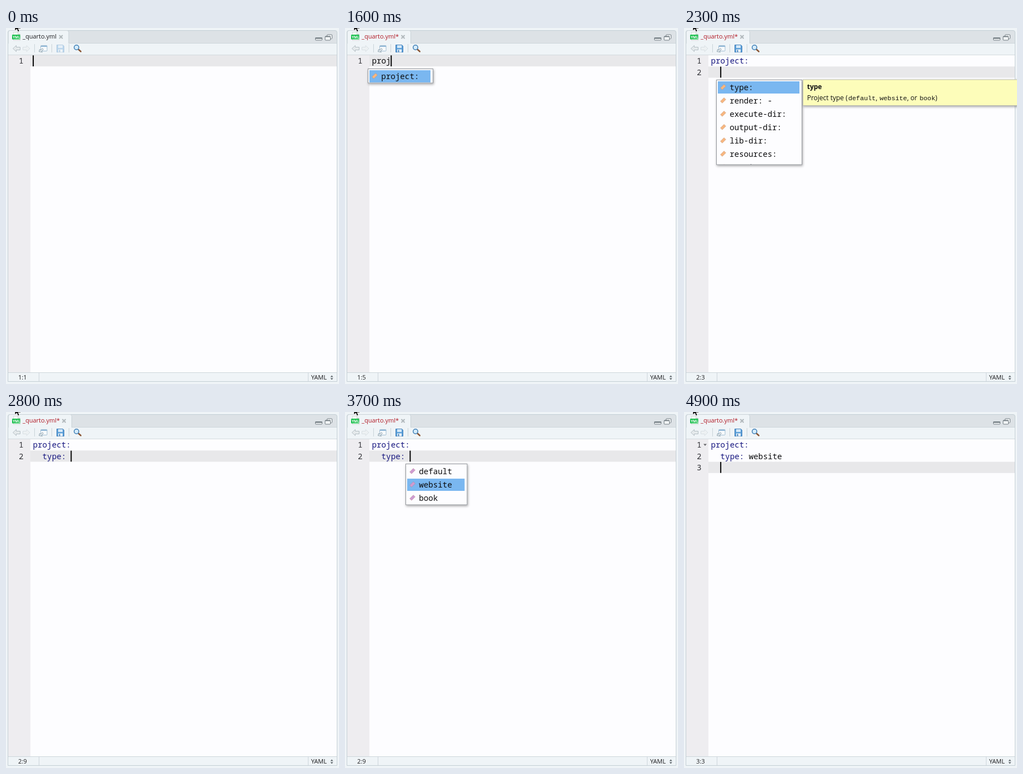
These frames come from a looping animation (600 by 641 pixels, 5000 ms). An HTML page:

```html
<!DOCTYPE html>
<html lang="en">
<head>
<meta charset="utf-8">
<title>Editor completion</title>
<style>
html, body { margin: 0; width: 100%; height: 100%; overflow: hidden; background: #eff4f7; }
svg { display: block; width: 600px; height: 641px; }
text { white-space: pre; font: 11px "Open Sans", "Noto Sans", sans-serif; fill: #1c1c1e; }
.code { font: 14.22px "Noto Sans Mono", "DejaVu Sans Mono", monospace; fill: #0b0b0d; }
.key { fill: #16167f; }
.num { fill: #333338; }
.tip { font-size: 12px; fill: #111; }
.mono { font: 11.75px "Liberation Mono", monospace; }
</style>
</head>
<body>
<svg viewBox="0 0 600 641" xmlns="http://www.w3.org/2000/svg">
  <defs>
    <filter id="shadow" x="-20%" y="-30%" width="140%" height="170%">
      <feDropShadow dx="1" dy="2" stdDeviation="2" flood-opacity=".35"/>
    </filter>
    <clipPath id="listClip"><rect x="59" y="94" width="153" height="151.5"/></clipPath>
  </defs>

  <!-- window -->
  <rect width="600" height="641" fill="#eff4f7"/>
  <path d="M3.5 636.5V8q0-3.5 3.5-3.5H593q3.5 0 3.5 3.5V636.5z" fill="#dde2e6" stroke="#c3ced4"/>
  <rect x="4" y="27" width="592" height="21" fill="#eff4f7"/>
  <path d="M113 27.5H596" stroke="#ced6db"/>
  <path id="tab" fill="#eff4f7" stroke="#c9d2d7"/>
  <rect x="4" y="48" width="592" height="573" fill="#fdfdff"/>
  <rect x="4" y="48" width="40" height="573" fill="#eeedf0"/>
  <path d="M4 48.5H596" stroke="#d3dade"/>
  <rect x="4" y="621" width="592" height="15" fill="#eff4f7"/>
  <path d="M4 620.5H596M59.5 621V636M544.5 621V636" stroke="#cdd6db"/>

  <!-- file icon -->
  <path d="M13.5 7.5H21.500L25.500 11.500V22.500H13.500z" fill="#fafcfb" stroke="#d3dbd8"/>
  <path d="M21.500 7.500V11.500H25.500" fill="none" stroke="#c3cfc8"/>
  <rect x="11" y="12" width="14.500" height="8.500" rx="1" fill="#18bf4c"/>
  <text x="12.200" y="18.600" style="font-size:6.200px;font-weight:700;fill:#fff">YML</text>

  <!-- toolbar -->
  <path id="back" d="M12.500 37L18.500 31.500V34.500H25.500V39.500H18.500V42.500z" fill="#e5eaec" stroke="#b5bfc5" stroke-linejoin="round"/>
  <path d="M43 37L37 31.500V34.500H30.500V39.500H37V42.500z" fill="#edf1f3" stroke="#d9e0e4" stroke-linejoin="round"/>
  <path d="M51.500 29V44M82.500 29V44M113.500 29V44" stroke="#c9d3d8"/>
  <rect x="62.500" y="31.500" width="11.500" height="10" rx="1" fill="#f7fafc" stroke="#a3bfd3"/>
  <path d="M63 33H74" stroke="#93b9d8" stroke-width="2"/>
  <path d="M59.500 42.500L60.500 38.500L62 40L65.500 36.500L67.500 38.500L64 42L65.500 43.500z" fill="#dfe7ec" stroke="#8195a3" stroke-width=".8"/>
  <g id="save">
    <path d="M91.500 30.500H102.500L104.500 32.500V43.500H91.500z" fill="#5c9fd8" stroke="#4381bb"/>
    <rect x="94" y="31" width="8" height="5" fill="#d4e8f8"/>
    <rect x="94" y="38.500" width="8" height="5" fill="#f4f8fb"/>
    <rect x="95.500" y="39.500" width="2" height="4" fill="#4381bb"/>
  </g>
  <path d="M130.500 38.500L134.700 42.300" stroke="#8a5534" stroke-width="2.600" stroke-linecap="round"/>
  <circle cx="127" cy="35" r="4.200" fill="#d6ecfb" stroke="#3f7fb6" stroke-width="1.500"/>

  <!-- window buttons -->
  <rect x="557.500" y="17.500" width="12" height="4.500" rx="1" fill="#f2f5f6" stroke="#737d83"/>
  <path d="M557 18.500H570" stroke="#737d83" stroke-width="2"/>
  <rect x="578.500" y="12" width="9" height="7.500" rx="1" fill="#f2f5f6" stroke="#737d83"/>
  <rect x="575" y="15" width="9.500" height="7" rx="1" fill="#f2f5f6" stroke="#737d83"/>
  <path d="M575 15.500H584.500" stroke="#737d83" stroke-width="1.600"/>

  <path d="M16 -11V5L19.500 1.800L21.600 6.800L24 5.800L22 1H27z" fill="#000" stroke="#fff" stroke-width=".8"/>

  <text id="title" x="30" y="19"></text>
  <path id="close" d="M-3 -3L3 3M3 -3L-3 3" stroke="#b0b7bb" stroke-width="2"/>
  <text id="pos" x="22" y="633"></text>
  <text x="549.800" y="633">YAML</text>
  <path d="M584.500 628.500L587 625.500L589.500 628.500zM584.500 630.500L587 633.500L589.500 630.500z" fill="#5b6368"/>
  <g id="view"></g>
</svg>
<script>
const LOOP = 5000, COL = 8.54, LEFT = 48.5, ROW = 20.3;
const $ = id => document.getElementById(id);

const fields = ["type:", "render: -", "execute-dir:", "output-dir:", "lib-dir:", "resources:", "preview:"];
const kinds = ["default", "website", "book"];
const start = { box: [41.5, 73.500, 117, 25.500], items: ["project:"], color: "#f7b780" };
const list = { box: [58.500, 93.500, 154, 152.500], items: fields, color: "#f7b780", clip: true };
const types = { box: [109.500, 93.500, 110.500, 73.500], items: kinds, color: "#cf9bd2" };

const nested = ["project:", "  "], typed = ["project:", "  type: "];
const done = ["project:", "  type: website"];

// Each step holds until the next one begins.
const steps = [
  { t: 0, lines: [""] },
  { t: 800, lines: ["p"] },
  { t: 900, lines: ["pr"] },
  { t: 1000, lines: ["pro"] },
  { t: 1200, lines: ["proj"] },
  { t: 1500, lines: ["proj"], menu: start },
  { t: 1800, lines: nested },
  { t: 2000, lines: nested, menu: list },
  { t: 2300, lines: nested, menu: list, tip: true },
  { t: 2700, lines: typed },
  { t: 2900, lines: typed, menu: types },
  { t: 3300, lines: typed, menu: types, pick: 1 },
  { t: 4200, lines: done, fold: true },
  { t: 4700, lines: [...done, "  "], fold: true }
];

const rect = (x, y, w, h, fill, more = "") =>
  `<rect x="${x}" y="${y}" width="${w}" height="${h}" fill="${fill}" ${more}/>`;
const text = (x, y, cls, s) => `<text x="${x}" y="${y}" class="${cls}">${s}</text>`;

function codeLine(s, i) {
  const y = 64.2 + i * ROW, cut = s.indexOf(":") + 1;
  const indent = s.length - s.trimStart().length;
  return text(23, y, "code num", i + 1) +
    text(LEFT + indent * COL, y, "code key", s.slice(indent, cut)) +
    text(LEFT + Math.max(cut, indent) * COL, y, "code", s.slice(Math.max(cut, indent)));
}

function menuView({ box: [x, y, w, h], items, color, clip }, pick = 0) {
  const rows = items.map((s, i) => {
    const cy = y + 13 + i * 24;
    return `<path transform="translate(${x + 12} ${cy})" d="M-5 1.500L1.500 -5L5 -1.800L-1.500 4.800z" fill="${color}" stroke="#a77d68" stroke-opacity=".45" stroke-width=".8"/>` +
      text(x + 23.700, cy + 5.300, "code", s);
  }).join("");
  return rect(x, y, w, h, "#fdfdff", 'stroke="#92959a" filter="url(#shadow)"') +
    rect(x + 2.500, y + 2.500 + pick * 24, w - 7, 22, "#7ab7f0") +
    `<g ${clip ? 'clip-path="url(#listClip)"' : ""}>${rows}</g>`;
}

function tipView() {
  const y = 129.700;
  const parts = [[221.700, "Project type ("], [296, "default", 1], [345.500, ", "], [352.500, "website", 1],
    [402, ", or "], [424.500, "book", 1], [452.700, ")"]];
  return rect(214.500, 93, 400, 46.500, "#fdfdba", 'stroke="#bfc0ae" filter="url(#shadow)"') +
    `<text x="221.700" y="109.700" class="tip" font-weight="700" style="font-weight:700">type</text>` +
    parts.map(([x, s, mono]) => text(x, y, mono ? "tip mono" : "tip", s)).join("");
}

function draw(s) {
  const dirty = s.t > 0, edge = dirty ? 118.500 : 113;
  const last = s.lines.length - 1, col = s.lines[last].length;
  const top = 49 + last * ROW;
  $("tab").setAttribute("d", `M4 28V8Q4 4.500 7.500 4.500H${edge - 3}Q${edge} 4.500 ${edge} 7.500V28`);
  $("title").textContent = "_quarto.yml" + (dirty ? "*" : "");
  $("title").style.fill = dirty ? "#b01722" : "#1c1c1e";
  $("close").setAttribute("transform", `translate(${dirty ? 104.500 : 99} 16)`);
  $("save").setAttribute("opacity", dirty ? 1 : .35);
  $("pos").textContent = `${last + 1}:${col + 1}`;
  $("view").innerHTML =
    rect(44, top, 552, 20.200, "#e8e8ea") +
    s.lines.map(codeLine).join("") +
    (s.fold ? '<path d="M35 57.500H41L38 61z" fill="#66666a"/>' : "") +
    rect(LEFT + col * COL - .4, top + .3, 2, 19.800, "#000") +
    (s.menu ? menuView(s.menu, s.pick) : "") +
    (s.tip ? tipView() : "");
}

let shown, origin = performance.now();
function frame(now) {
  const t = Math.max(0, now - origin) % LOOP;
  const step = steps.findLast(s => s.t <= t);
  if (step !== shown) draw(shown = step);
  requestAnimationFrame(frame);
}
frame(origin);
</script>
</body>
</html>
```
